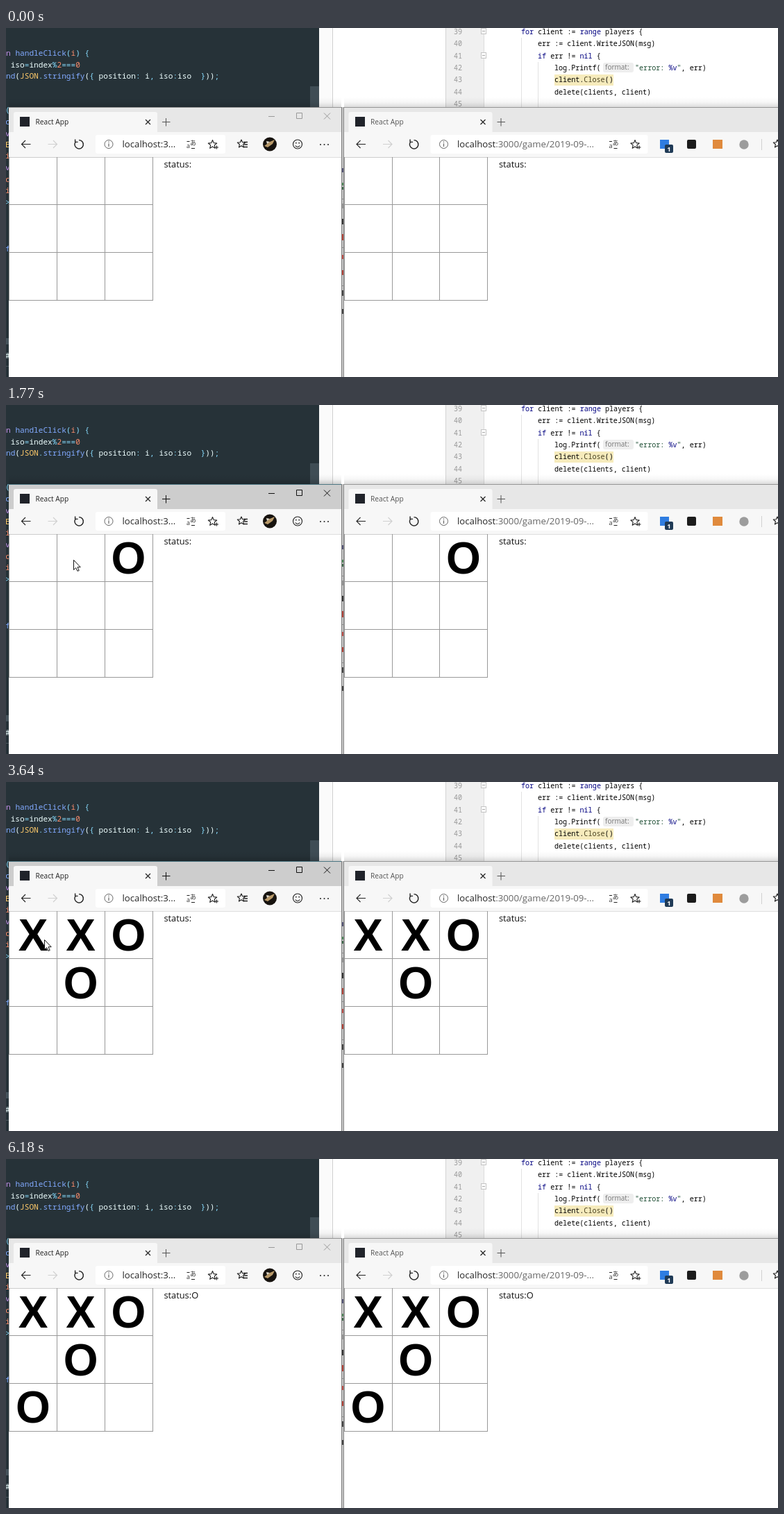
An HTML page for the animation above (6260 ms loop, 1112 px wide and 503 px high).

```html
<!DOCTYPE html>
<html lang="en">
<head>
<meta charset="utf-8">
<title>Tic-tac-toe in two windows</title>
<style>
html, body { margin: 0; width: 100%; height: 100%; overflow: hidden; background: #fff; }
svg { display: block; width: 1112px; height: 503px; }
text { white-space: pre; }
rect, .crisp { shape-rendering: crispEdges; }
.round { shape-rendering: auto; }
.mono { font-family: "Noto Sans Mono", "DejaVu Sans Mono", monospace; }
.dark { font-size: 11.13px; fill: #eeffff; }
.light { font-size: 10.08px; font-weight: 500; fill: #000; }
.ui { font-family: "Open Sans", "Noto Sans", sans-serif; }
.mark { font: bold 64px "Liberation Sans", Arial, sans-serif; text-anchor: middle; }
.line { fill: none; stroke: #222; stroke-width: 1.15; }
.strip { fill: #e7e7e7; }
.edge { fill: #969696; }
.shade { opacity: .7; }
.tab { fill: #555; }
.plus { stroke: #555; }
.ctl { stroke: #999; stroke-width: 1; }
.active .strip { fill: #cdcdcd; }
.active .edge { fill: #4d7783; }
.active .shade { opacity: 1; }
.active .tab, #w0 .tab { fill: #222; }
.active .plus, .active .ctl { stroke: #111; }
.c { fill: #89ddff; } .b { fill: #82aaff; } .o { fill: #f78c6c; }
.p { fill: #c792ea; } .y { fill: #ffcb6b; }
.k { fill: #000080; } .s { fill: #1d4d33; }
</style>
</head>
<body>
<svg id="stage" viewBox="0 0 1112 503" xmlns="http://www.w3.org/2000/svg"></svg>
<script>
const LOOP = 6260;
const stage = document.getElementById('stage');

const rect = (x, y, w, h, fill, more = '') =>
  `<rect x="${x}" y="${y}" width="${w}" height="${h}" fill="${fill}" ${more}/>`;
const text = (x, y, body, cls, more = '') =>
  `<text x="${x}" y="${y}" class="${cls}" ${more}>${body}</text>`;
const path = (d, cls = 'line', more = '') => `<path d="${d}" class="${cls}" ${more}/>`;
const circle = (x, y, r, more) => `<circle cx="${x}" cy="${y}" r="${r}" ${more}/>`;
const span = (cls, s) => `<tspan class="${cls}">${s}</tspan>`;

function star(cx, cy, r) {
  const pts = Array.from({ length: 10 }, (_, i) => {
    const a = i * Math.PI / 5 - Math.PI / 2, q = i % 2 ? r * .45 : r;
    return (cx + q * Math.cos(a)).toFixed(1) + ' ' + (cy + q * Math.sin(a)).toFixed(1);
  });
  return path('M' + pts.join('L') + 'Z', 'line', 'stroke-linejoin="round"');
}

function darkEditor() {
  const lines = [
    [40, span('p', 'n') + ' ' + span('b', 'handleClick') + span('c', '(') + span('o', 'i') + span('c', ') {')],
    [57, ' iso' + span('c', '=') + 'index' + span('c', '%') + span('o', '2') + span('c', '===') + span('o', '0')],
    [73, span('b', 'nd') + '(' + span('y', 'JSON') + span('c', '.') + span('b', 'stringify') + '(' + span('c', '{') +
      ' position' + span('c', ':') + ' i' + span('c', ',') + ' iso' + span('c', ':') + 'iso  ' + span('c', '}') + '))' + span('c', ';')]
  ];
  const bits = [['(', 122, 'c'], ['c', 139, 'b'], ['v', 156, 'p'], ['E', 172, 'y'], ['i', 188, 'o'], ['v', 205, 'p'],
    ['c', 222, 'o'], ['i', 238, 'o'], ['&gt;', 255, 'c'], ['f', 322, 'b'], ['#', 476, '']];
  return rect(0, 0, 451, 503, '#263238') + rect(438, 84, 13, 31, '#3f4d55') +
    rect(0, 447, 4, 9, '#46545c') + rect(0, 487, 4, 1, '#4b575d') +
    lines.map(([y, s]) => text(0, y, s, 'mono dark')).join('') +
    bits.map(([s, y, c]) => text(-1, y, span(c, s), 'mono dark')).join('');
}

function lightEditor() {
  const code = [
    [742, 9, span('k', 'for') + ' client := ' + span('k', 'range') + ' players {'],
    [766, 26, 'err := client.WriteJSON(msg)'],
    [766, 44, span('k', 'if') + ' err != ' + span('k', 'nil') + ' {'],
    [790, 61, 'log.Printf('],
    [906, 61, span('s', '"error: ') + span('k', '%v') + span('s', '"') + ', err)'],
    [790, 78, 'client.<tspan fill="#4a4220">Close</tspan>()'],
    [790, 96, 'delete(clients, client)']
  ];
  const fold = y => rect(684.5, y - 4.5, 7, 8, '#fff', 'stroke="#c4c4c4" rx="1"') +
    path(`M686 ${y - .5}h4`, 'crisp', 'stroke="#aaa"');
  return rect(451, 0, 19, 115, '#fbfbfb') + rect(470, 0, 1, 115, '#d0d0d0') +
    rect(633, 0, 55, 115, '#f0f0f0') + rect(633, 0, 1, 115, '#d4d4d4') + rect(688, 0, 1, 115, '#dcdcdc') +
    rect(742, 14, 1, 101, '#e2e2e2') + rect(766, 49, 1, 66, '#e2e2e2') + fold(5) + fold(40) +
    [39, 40, 41, 42, 43, 44, 45].map((n, i) => text(645, 9 + Math.round(i * 17.35), n, 'mono light', 'style="fill:#999"')).join('') +
    rect(790, 67, 85, 16, '#f6ebbc') + rect(860, 50, 44, 14, '#eeeeee', 'rx="3" class="round"') +
    text(863, 60, 'format:', 'ui', 'font-size="10" fill="#777"') +
    code.map(([x, y, s]) => text(x, y, s, 'mono light')).join('');
}

// Slivers of the editor seen between the two windows
function gap() {
  const bits = [[202, 6, '#555577'], [223, 4, '#4f8a5a'], [229, 4, '#3f6b4a'], [253, 7, '#999'], [275, 8, '#333'],
    [297, 9, '#b5443a'], [327, 6, '#c0504a'], [349, 7, '#b5443a'], [378, 8, '#444'], [405, 7, '#444']];
  return rect(483, 114, 4, 389, '#c6c6c6') + bits.map(([y, h, c]) => rect(483, y, 4, h, c)).join('') +
    [246, 316, 371].map(y => rect(483, y, 4, 1, '#8c8c8c')).join('') +
    rect(483, 114, 1, 389, '#7d7d7d') + rect(486, 114, 1, 389, '#8a8a8a');
}

// Parts that both windows share, in the left window's coordinates
function chrome(pill, url) {
  const t = pill - 187;
  return rect(11, 121, 207, 32, '#f7f7f7', 'rx="3" class="round"') +
    rect(20, 128, 14, 14, '#20232a') +
    text(42.5, 139, 'React App', 'ui tab', 'font-size="10.2"') +
    path('M201 132l7 7m0-7l-7 7', 'line') +
    path('M225 135.5h11.5M230.5 130v11.5', 'plus') +
    path('M35.5 167.5h-13m5.5-5.5l-5.5 5.5l5.5 5.5') +
    path('M60.5 167.5h13m-5.5-5.5l5.5 5.5l-5.5 5.5', 'line', 'style="stroke:#d0d0d0"') +
    path('M100.2 164.1A6.2 6.2 0 1 0 105 161.6M99.6 160.4v4h4', 'line', 'style="stroke-width:1.4"') +
    rect(129, 154, pill, 27, '#fff', 'rx="3" class="round"') +
    circle(148, 167.5, 6, 'fill="none" stroke="#666"') + path('M148 166.3v4.7M148 163.6v1.4', '', 'stroke="#666" stroke-width="1.2"') +
    text(167.5, 172, '<tspan fill="#222">localhost</tspan>' + url, 'ui', 'font-size="13.2" fill="#666"') +
    text(265 + t, 169, 'あ', '', 'font-family="Noto Sans CJK JP, Noto Sans CJK, sans-serif" font-size="9" fill="#333"') +
    text(260 + t, 173, 'a', 'ui', 'font-size="9" fill="#333"') +
    path(`M${260.5 + t} 163.5h4M${267 + t} 173.5h5`, 'line') +
    star(297.5 + t, 168, 6.5) + path(`M${301 + t} 172h5M${303.5 + t} 169.5v5`);
}

function favourites(x) {
  return star(x + 5, 167, 6) + path(`M${x + 8} 164.5h6M${x + 9} 168h5M${x + 8} 171.5h6`, 'line', 'style="stroke-width:1.4"');
}

function board(dx) {
  const at = i => Math.round(4.4 + dx + i * 68.7);
  const rows = [186, 254, 323, 392];
  return rows.map((y, i) =>
    rect(at(0), y, at(3) - at(0) + 1, 1, i ? '#999' : '#ccc') + rect(at(i), 186, 1, 207, '#999')).join('');
}

// Cell, time it fills, sign
const moves = [[2, 850, 'O'], [1, 1850, 'X'], [4, 2730, 'O'], [0, 3640, 'X'], [6, 5270, 'O']];

function page(id) {
  const dx = id * 482.5;
  return board(dx) + moves.map(([cell, t, sign]) =>
    text(39 + dx + cell % 3 * 68.7, 243 + Math.floor(cell / 3) * 68.7, sign, 'mark', `data-from="${t}"`)).join('') +
    text(227.5 + dx, 201, 'status:<tspan data-from="5270">O</tspan>', 'ui', 'font-size="12.8" fill="#111"');
}

function frame(x, w) {
  return rect(x, 100, w, 14, 'url(#shade)', 'class="shade"') + rect(x, 114, w, 389, '#fff') +
    rect(x, 115, w, 35, '', 'class="strip"') + rect(x, 114, w, 1, '', 'class="edge"') +
    rect(x, 150, w, 36, '#f7f7f7') + rect(x, 186, w, 1, '#dedede');
}

function leftWindow() {
  return `<g id="w0">${frame(4, 479)}${chrome(187, '<tspan fill="#222">:3...</tspan>')}` +
    path('M378 127.5h9M418.5 122.5h8v8h-8zM458 122.5l9 9m0-9l-9 9', 'ctl', 'fill="none"') +
    favourites(334) + circle(380, 167.5, 10, 'fill="#17130f"') +
    path('M372 170l8-6l7-3l-3 6l-7 5z', '', 'fill="#b99a6a"') + path('M375 163l5 1l-4 3z', '', 'fill="#e8e2d4"') +
    circle(420, 167.5, 6.5, 'class="line"') + path('M416.7 169.5q3.3 4 6.6 0') +
    circle(417.8, 165.7, .9, 'fill="#222"') + circle(422.2, 165.7, .9, 'fill="#222"') +
    [453, 458.5, 464].map(x => circle(x, 168, 1, 'fill="#222"')).join('') + page(0) + '</g>';
}

function rightWindow() {
  return `<g id="w1">${frame(487, 625)}<g transform="translate(482.5)">${chrome(313, ':3000/game/2019-09-...')}</g>` +
    rect(942, 161, 13, 13, '#2f7de1') + rect(949, 168, 12, 12, '#1f3a56', 'rx="2" class="round"') +
    text(955, 177.5, '1', 'ui', 'font-size="9.5" font-weight="bold" fill="#fff" text-anchor="middle"') +
    rect(981, 161, 13, 13, '#1b1b1b', 'rx="2" class="round"') + rect(1018, 161, 14, 13, '#e08a3c') +
    circle(1063, 168, 6.7, 'fill="#9c9c9c"') + rect(1088, 160, 1, 16, '#d0d0d0') + favourites(1106) + page(1) + '</g>';
}

stage.innerHTML = `<defs><linearGradient id="shade" x2="0" y2="1"><stop offset="0" stop-opacity="0"/>
  <stop offset=".5" stop-opacity=".05"/><stop offset="1" stop-opacity=".2"/></linearGradient></defs>` +
  lightEditor() + darkEditor() + leftWindow() + rightWindow() + gap() +
  path('M.5 .5V14.6L3.7 11.6L6 16.4L8.2 15.5L6 10.7H10.2Z', '', 'id="cursor" fill="#fff" stroke="#111"');

// Pointer travel: first step, last step, step count, end point
const travel = [
  [70, 450, 6, 650, 220], [1010, 1370, 5, 76, 223], [1460, 1460, 1, 75, 223], [1620, 1770, 3, 97, 223],
  [1930, 2160, 4, 475, 313], [2250, 2490, 4, 573, 295], [2810, 3170, 6, 147, 237], [3270, 3270, 1, 87, 230],
  [3340, 3400, 2, 55, 227], [3800, 4410, 9, 530, 342], [4510, 4580, 2, 540, 345], [4810, 4900, 2, 540, 350],
  [5510, 5720, 4, 1059, 498]
];
// Time a window gains focus, window index
const focus = [[0, -1], [770, 1], [1770, 0], [2650, 1], [3570, 0], [5190, 1], [6180, -1]];

const cursor = document.getElementById('cursor');
const windows = [0, 1].map(i => document.getElementById('w' + i));
const timed = [...document.querySelectorAll('[data-from]')];

function pointer(t) {
  let x = 925, y = 462;
  for (const [t0, t1, n, x1, y1] of travel) {
    if (t < t0) break;
    const step = n > 1 ? Math.floor((t - t0) / (t1 - t0) * (n - 1) + 1e-6) + 1 : 1;
    const p = Math.min(step / n, 1), e = p * p * (3 - 2 * p);
    x += (x1 - x) * e;
    y += (y1 - y) * e;
  }
  return [Math.round(x), Math.round(y)];
}

function draw() {
  const t = performance.now() % LOOP;
  const [x, y] = pointer(t);
  cursor.setAttribute('transform', `translate(${x} ${y})`);
  cursor.setAttribute('visibility', t >= 70 && t < 5880 ? 'visible' : 'hidden');
  const front = focus.filter(f => f[0] <= t).pop()[1];
  windows.forEach((w, i) => w.classList.toggle('active', i === front));
  timed.forEach(el => el.setAttribute('visibility', t >= +el.dataset.from ? 'visible' : 'hidden'));
  requestAnimationFrame(draw);
}
draw();
</script>
</body>
</html>
```
